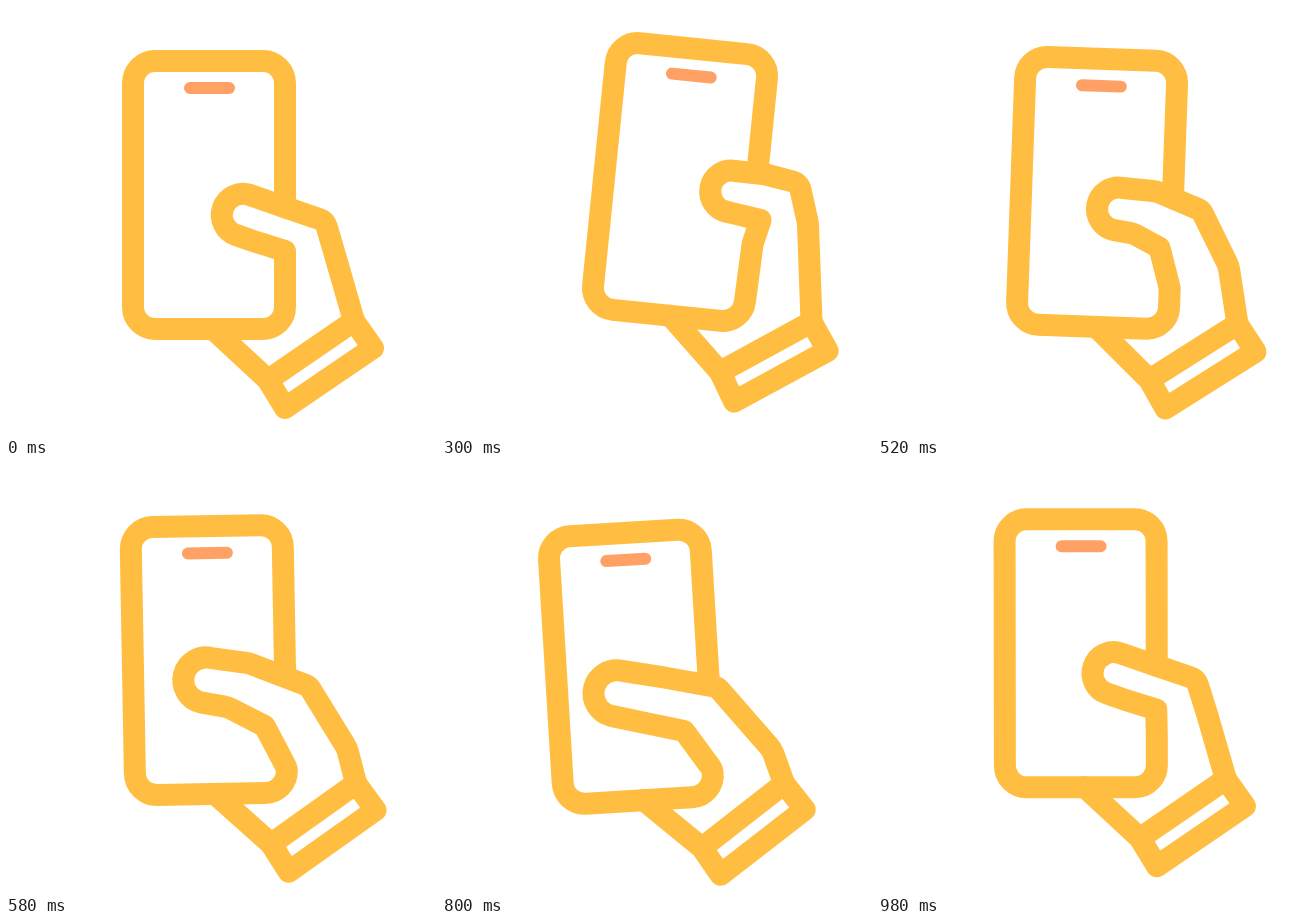
Write an HTML page with a canvas that moves like this. It is 430 by 430 pixels and loops after 1 s.

```html
<!DOCTYPE html>
<html lang="en">
<head>
<meta charset="utf-8">
<title>Phone in hand</title>
<style>
  html, body { margin: 0; width: 100%; height: 100%; overflow: hidden; background: #fff; }
  canvas { display: block; width: 430px; height: 430px; }
</style>
</head>
<body>
<canvas id="stage"></canvas>
<script>
const SIZE = 430, LOOP = 1000;
const YELLOW = '#ffbe41', ORANGE = '#ffa164';
const PIVOT = [203, 189];
const LEFT = 127, RIGHT = 279, TOP = 55, BOTTOM = 323, RADIUS = 22;
const WRIST = [348, 315], HEEL = [262, 374];

// shift x, shift y, tilt in degrees, then the points of the hand:
// palm, joint, under, thumb bottom, thumb top, upper, knuckle, side
const home  = [0, 0, 0, 279, 270, 279, 245, 250, 236, 230, 229, 244, 189, 275, 200, 319, 215, 329, 249];
const rise  = [25.8, -10, 4.1, 279, 255, 279, 224, 259, 216.6, 239.7, 209.4, 250.8, 167.5, 278, 172, 310.4, 177, 330.3, 214];
const high  = [35, -13, 5.8, 281.5, 243, 287, 218.6, 270, 216.3, 252.8, 214, 256.6, 172.5, 286, 172.7, 321.5, 178, 334.4, 217];
const turn  = [34.6, -12.6, 5.6, 279, 250, 280.7, 219, 266, 218.5, 252.5, 218, 254.5, 177.5, 284.5, 175.6, 314, 178.7, 333.3, 222];
const drop  = [0, 7, -1, 279, 298.4, 257.8, 256, 221.2, 236.3, 194.3, 231, 206, 187, 243, 192.7, 302.5, 216.8, 339.5, 279.4];
const back  = [-13.3, 13.8, -3.5, 277, 296, 251.3, 256.3, 213, 246, 179.3, 236.8, 193, 192.6, 234.5, 201.7, 287, 214.4, 338, 280.6];

const mix = (a, b, k) => a.map((v, i) => v + (b[i] - v) * k);

const keys = [
  [0, home], [160, rise], [300, high], [370, mix(home, high, 1.02)], [440, turn],
  [580, drop], [710, mix(home, back, 1.2)], [800, back], [LOOP, home]
];

// monotone cubic slopes, flat at every extreme
const slopes = keys.map(([t, pose], n) => pose.map((v, i) => {
  if (n === 0 || n === keys.length - 1) return 0;
  const [t0, p0] = keys[n - 1], [t1, p1] = keys[n + 1];
  const a = (v - p0[i]) / (t - t0), b = (p1[i] - v) / (t1 - t);
  return a * b <= 0 ? 0 : 2 * a * b / (a + b);
}));

function poseAt(t) {
  let n = 0;
  while (n < keys.length - 2 && t >= keys[n + 1][0]) n++;
  const [t0, p] = keys[n], [t1, q] = keys[n + 1];
  const d = t1 - t0, u = (t - t0) / d, w = 1 - u;
  return p.map((v, i) =>
    v * w * w * (1 + 2 * u) + q[i] * u * u * (3 - 2 * u) +
    d * u * w * (slopes[n][i] * w - slopes[n + 1][i] * u));
}

const canvas = document.getElementById('stage');
const ctx = canvas.getContext('2d');
const ratio = window.devicePixelRatio || 1;
canvas.width = canvas.height = Math.round(SIZE * ratio);

const bend = (a, b, r) => ctx.arcTo(a[0], a[1], b[0], b[1], r);

function stroke(color, width, trace) {
  ctx.strokeStyle = color;
  ctx.lineWidth = width;
  ctx.beginPath();
  trace();
  ctx.stroke();
}

function drawBody(pts) {
  const [palm, joint, under, low, top, upper, knuckle, side] = pts;
  const slope = (knuckle[1] - upper[1]) / (knuckle[0] - upper[0]);
  const tl = [LEFT, TOP], tr = [RIGHT, TOP], bl = [LEFT, BOTTOM], br = [RIGHT, BOTTOM];

  // phone outline, running on into the thumb and the back of the hand
  ctx.moveTo(RIGHT, upper[1] + (RIGHT - upper[0]) * slope);
  bend(tr, tl, RADIUS);
  bend(tl, bl, RADIUS);
  bend(bl, br, RADIUS);
  bend(br, palm, RADIUS);
  bend(palm, joint, 10);
  ctx.lineTo(...joint);
  bend(under, low, 20);
  ctx.lineTo(...low);
  const dx = low[0] - top[0], dy = low[1] - top[1], a = Math.atan2(dy, dx);
  ctx.arc((low[0] + top[0]) / 2, (low[1] + top[1]) / 2, Math.hypot(dx, dy) / 2, a, a + Math.PI);
  bend(upper, knuckle, 20);
  bend(knuckle, side, 11);
  bend(side, WRIST, 25);
  ctx.lineTo(...WRIST);
}

function drawCuff() {
  ctx.moveTo(207, BOTTOM);
  ctx.lineTo(...HEEL);
  ctx.moveTo(...WRIST);
  ctx.lineTo(367, 342);
  ctx.lineTo(279, 402);
  ctx.lineTo(...HEEL);
  ctx.closePath();
}

function draw(t) {
  const [x, y, tilt, ...flat] = poseAt(t);
  const pts = [];
  for (let i = 0; i < flat.length; i += 2) pts.push([flat[i], flat[i + 1]]);

  ctx.setTransform(ratio, 0, 0, ratio, 0, 0);
  ctx.fillStyle = '#fff';
  ctx.fillRect(0, 0, SIZE, SIZE);
  ctx.translate(PIVOT[0] + x, PIVOT[1] + y);
  ctx.rotate(tilt * Math.PI / 180);
  ctx.translate(-PIVOT[0], -PIVOT[1]);
  ctx.lineCap = ctx.lineJoin = 'round';

  stroke(YELLOW, 22, drawCuff);
  stroke(YELLOW, 22, () => drawBody(pts));
  stroke(ORANGE, 12, () => {
    ctx.moveTo(184, 82);
    ctx.lineTo(223, 82);
  });
}

const start = performance.now();
function tick() {
  draw((performance.now() - start) % LOOP);
  requestAnimationFrame(tick);
}
tick();
</script>
</body>
</html>
```
